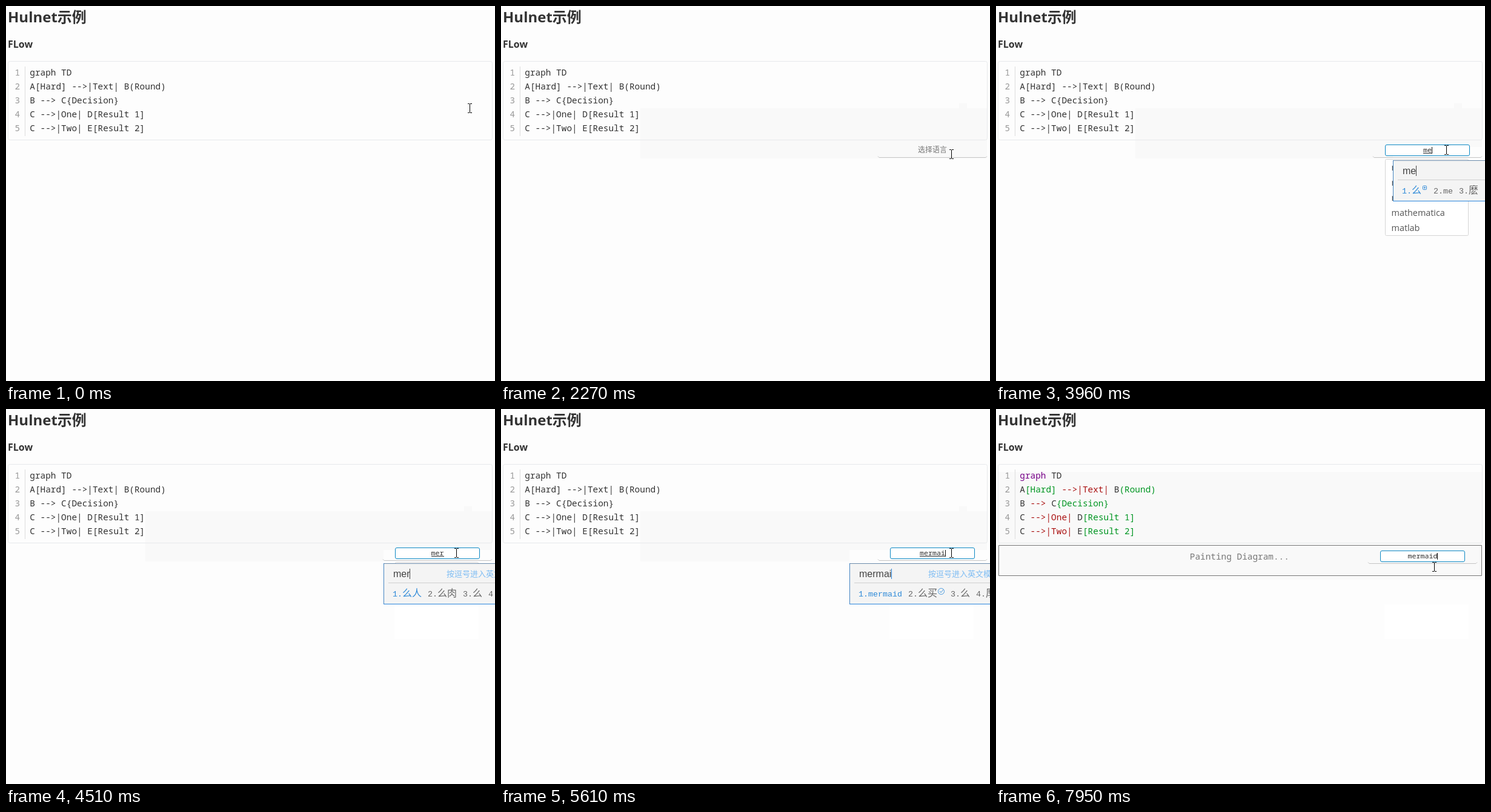
Write an HTML page with a canvas that moves like this. It is 807 px wide and 620 px high and loops after 8 s.

```html
<!DOCTYPE html>
<html lang="zh">
<head>
<meta charset="utf-8">
<style>
html, body { margin: 0; width: 100%; height: 100%; overflow: hidden; background: #fdfdfd; }
canvas { display: block; position: fixed; left: 0; top: 0; }
</style>
</head>
<body>
<canvas id="stage" width="807" height="620"></canvas>
<script>
const ctx = document.getElementById('stage').getContext('2d');
const LOOP = 8000;
const PAGE = '#fdfdfd', TINT = '#f9f9f9', INK = '#333';
const CJK = '"Noto Sans CJK SC", "Noto Sans CJK", sans-serif';
const SANS = '"Open Sans", ' + CJK;
const MONO = '"Noto Sans Mono", monospace';
const CODE_FONT = '14.4px ' + MONO;

const CODE = [
  'graph TD',
  'A[Hard] -->|Text| B(Round)',
  'B --> C{Decision}',
  'C -->|One| D[Result 1]',
  'C -->|Two| E[Result 2]'
];
const LANGUAGES = ['markdown', 'mariadb', 'mirc', 'mathematica', 'matlab'];

// mouse: time, centre x, top y
const MOUSE = [
  [0, 765, 161], [90, 762, 163], [180, 758, 166], [270, 755, 169], [360, 753, 171],
  [640, 751, 170], [2000, 758, 188], [2090, 754, 211], [2180, 748, 230], [2270, 743, 237],
  [2460, 743, 233], [2550, 743, 230], [7130, 738, 239], [7220, 729, 249], [7310, 723, 253]
];
const TYPED = [[0, ''], [3780, 'm'], [3960, 'me'], [4050, 'mer'], [4780, 'merm'],
  [5330, 'merma'], [5610, 'mermai'], [6790, 'mermaid']];
const CARET_OFF = [[3230, 3780], [4510, 4600], [6170, 6640], [7590, 7770]];

// input method window: left edge, hint x, candidates, badge after a candidate
const IME = {
  m: { x: 655, words: ['没', '吗', '么', '买'] },
  me: { x: 655, words: ['么', 'me', '麽'], badge: ['plus', 0] },
  mer: { x: 623, hint: 727, words: ['么人', '么肉', '么', '麽'] },
  merm: { x: 591, hint: 707, words: ['mermaid', '么人', '么肉', '么'] },
  merma: { x: 575, hint: 707, words: ['mermaid', '么马', '么吗', '么'] },
  mermai: { x: 575, hint: 705, words: ['mermaid', '么买', '么', '厚'], badge: ['check', 1] }
};

const between = (t, a, b) => t >= a && t < b;
const latest = (keys, t) => keys.filter(k => k[0] <= t).pop();

function fill(x, y, w, h, color) {
  ctx.fillStyle = color;
  ctx.fillRect(x, y, w, h);
}

function text(s, x, y, font, color, align = 'left') {
  ctx.font = font;
  ctx.fillStyle = color;
  ctx.textAlign = align;
  ctx.fillText(s, x, y);
}

function box(x, y, w, h, r, edge, bg) {
  ctx.beginPath();
  ctx.roundRect(x + .5, y + .5, w - 1, h - 1, r);
  if (bg) { ctx.fillStyle = bg; ctx.fill(); }
  ctx.strokeStyle = edge;
  ctx.lineWidth = 1;
  ctx.stroke();
}

function path(points, color) {
  ctx.beginPath();
  points.forEach(p => ctx.lineTo(p[0], p[1]));
  ctx.strokeStyle = color;
  ctx.lineWidth = 1;
  ctx.stroke();
}

function codeLine(line, y, colored) {
  const cell = 8.64;
  if (!colored) return text(line, 39.3, y, CODE_FONT, INK);
  const parts = line.match(/graph|\[.*?\]|\(.*?\)|\{.*?\}|-->(\|.*?\|)?|[^]/g);
  let col = 0;
  for (const part of parts) {
    const color = part === 'graph' ? '#770088'
      : part.startsWith('-->') ? '#aa1111'
      : /^[\[({]/.test(part) ? '#009622' : INK;
    text(part, 39.3 + col * cell, y, CODE_FONT, color);
    col += part.length;
  }
}

function editor(t, painted) {
  text('Hulnet示例', 3, 27, 'bold 24px ' + SANS, INK);
  text('FLow', 3, 69, 'bold 16px ' + SANS, INK);
  if (painted) {
    fill(4, 104, 798, 178, TINT);
  } else if (t >= 1720) {
    fill(230, 169, 572, 83, TINT);
    fill(756, 161, 13, 9, TINT);
  }
  box(3, 91, 800, 131, 3, '#e7e9eb');
  fill(31, 100, 1, 115, '#ddd');
  CODE.forEach((line, i) => {
    const y = 115 + i * 23;
    text(i + 1, 14.5, y, CODE_FONT, '#999');
    codeLine(line, y, painted);
  });
  if (between(t, 1720, 2180)) fill(230, 171, 1, 17, INK);
}

function languageBar(t, dx, dy, typed) {
  const x = 622 + dx, y = 226 + dy;
  path([[x, y + 22.5], [x + 2, y + 24.5], [x + 178, y + 24.5], [x + 180, y + 22.5]], '#c4c4c4');
  const mid = 712 + dx;
  if (t < 2800) return text('选择语言', mid, 242, '12px ' + CJK, '#777', 'center');

  box(642 + dx, 229 + dy, 140, 19, 2.5, '#0c88c4', '#fff');
  const left = mid - typed.length * 3.5;
  text(typed, left, 242 + dy, '11.67px ' + MONO, INK);
  if (typed && t < 6790) fill(Math.round(left), 243, typed.length * 7, 1, INK);
  if (!CARET_OFF.some(r => between(t, ...r))) {
    fill(Math.floor(mid + typed.length * 3.5), 233 + dy, 1, 11, '#111');
  }
}

function dropdown(t) {
  const full = between(t, 3960, 4230), single = between(t, 6790, 7770);
  if (!full && !single && !between(t, 4230, 4960)) return;
  box(642, 253, 138, full ? 127 : 28, 2, '#d5d5d5', '#fff');
  if (single && t >= 7220) fill(643, 255, 136, 24, '#f3f3f3');
  (full ? LANGUAGES : ['mermaid']).forEach((name, i) =>
    text(name, 652.5, 272 + i * 25, '14.4px ' + SANS, '#555'));
}

function badge(kind, x) {
  if (kind === 'plus') {
    box(x + 2, 297, 7, 7, 1, '#2f8ad8');
    fill(x + 4, 300, 3, 1, '#2f8ad8');
    fill(x + 5, 299, 1, 3, '#2f8ad8');
    return 10;
  }
  box(x + 1, 296, 11, 11, 5, '#4a9ade');
  path([[x + 4, 301], [x + 6, 303.5], [x + 10, 298.5]], '#4a9ade');
  return 12;
}

function candidate(s, x, color) {
  for (const ch of s) {
    const wide = ch > '\u2000';
    text(ch, x, 310, wide ? '16px ' + CJK : '13.33px "Liberation Mono", monospace', color);
    x += wide ? 16 : 8;
  }
  return x;
}

function inputMethod(t, typed) {
  const ime = IME[typed];
  const { x } = ime;
  fill(x, 255, 807 - x, 68, '#f4f4f4');
  fill(x, 255, 807 - x, 1, '#6d8cab');
  fill(x, 255, 1, 68, '#4585c2');
  fill(x, 322, 807 - x, 1, '#2a86dc');
  fill(x + 8, 287, 807 - x, 1, '#cfcfcf');

  text(typed, x + 16, 278, '16px "Liberation Sans", sans-serif', '#444');
  fill(Math.floor(x + 16 + ctx.measureText(typed).width), 264, 1, 17,
    typed === 'mermai' ? '#2a86dc' : '#444');
  if (ime.hint && t >= 4510) text('按逗号进入英文模式', ime.hint, 277, '13px ' + CJK, '#7dbcf3');

  let at = x + 15;
  ime.words.forEach((word, i) => {
    at = candidate(i + 1 + '.' + word, at, i ? '#666' : '#2f8ad8');
    if (ime.badge && ime.badge[1] === i) at += badge(ime.badge[0], at);
    at += 10;
  });
}

function mouse(t) {
  if (between(t, 7770, 7950)) return;
  const [, x, y] = latest(MOUSE, t);
  for (const row of [y, y + 15]) {
    fill(x - 3, row, 3, 1, '#000');
    fill(x + 1, row, 3, 1, '#000');
  }
  fill(x, y + 1, 1, 14, '#000');
}

function draw(t) {
  const painted = t >= 7770;
  const typed = latest(TYPED, t)[1];
  const composing = typed && t < 6790;

  fill(0, 0, 807, 620, PAGE);
  editor(t, painted);
  if (t >= 4230) fill(641, 323, 139, 57, '#fff');
  if (!painted && t >= 3780) {
    const left = composing ? IME[typed].x : 575;
    fill(left, 233, 807 - left, 20, PAGE);
  }
  if (painted) {
    box(4, 225, 798, 51, 0, '#777');
    text('Painting Diagram...', 319.8, 249, CODE_FONT, '#777');
    languageBar(t, -8, 5, typed);
  } else if (t >= 1720) {
    languageBar(t, 0, 0, typed);
  }
  dropdown(t);
  if (composing) inputMethod(t, typed);
  mouse(t);
}

const start = performance.now();
function tick() {
  draw((performance.now() - start) % LOOP);
  requestAnimationFrame(tick);
}
tick();
</script>
</body>
</html>
```
